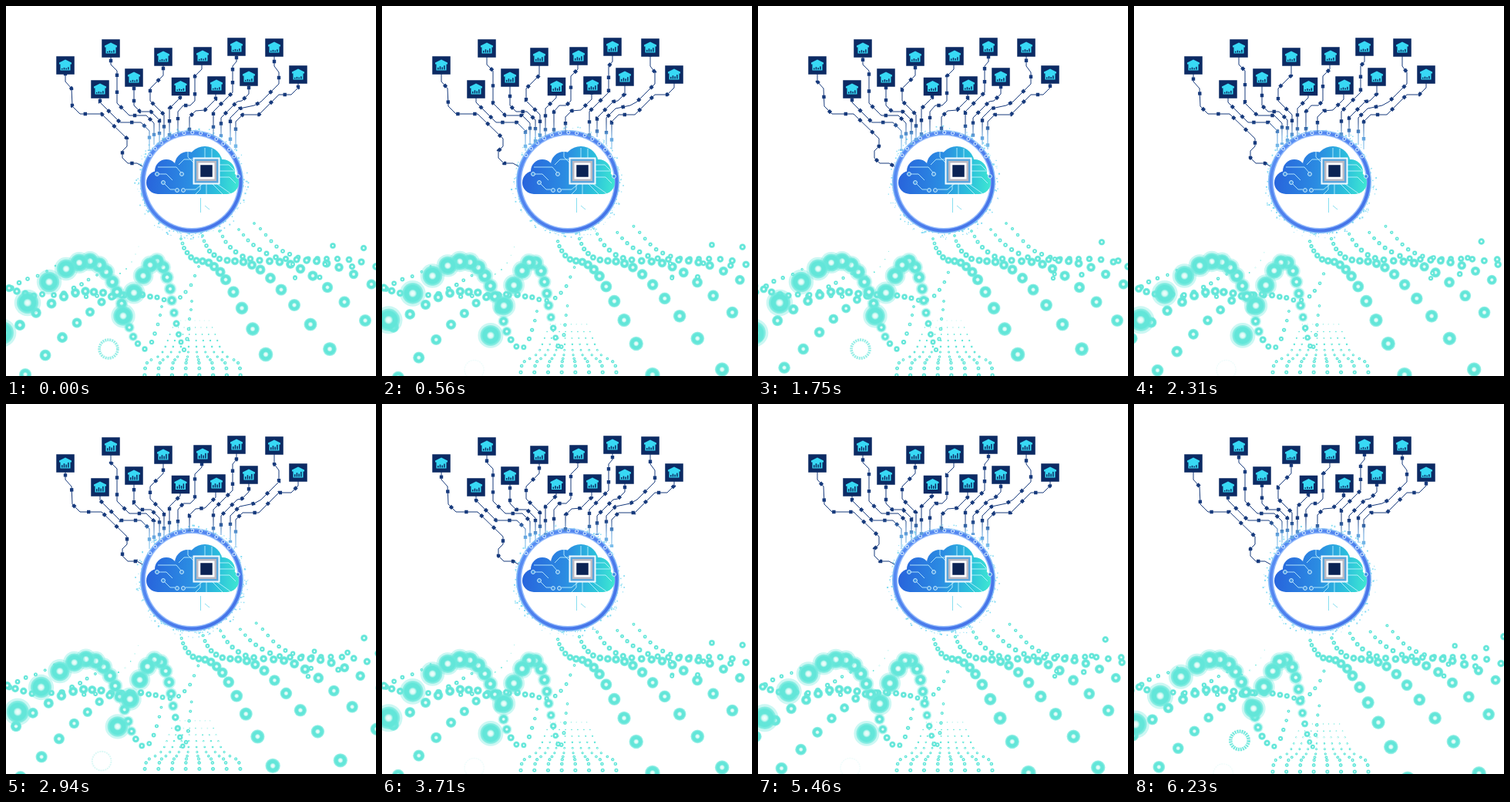
An HTML page with a canvas that plays this animation: 480x480 px, repeating every 6300 ms.

```html
<!DOCTYPE html>
<html lang="en">
<head>
<meta charset="utf-8">
<title>Cloud data streams</title>
<style>
html, body { margin: 0; width: 100%; height: 100%; overflow: hidden; background: #fff; }
canvas { display: block; width: 480px; height: 480px; }
</style>
</head>
<body>
<canvas id="stage" width="480" height="480"></canvas>
<script>
const ctx = document.getElementById('stage').getContext('2d');
const STEP = 70, STEPS = 90, TAU = Math.PI * 2;
const NAVY = '#0c2a63';
let step = 0;

// Position in 0..1 of a motion that repeats `cycles` times per loop
const phase = cycles => (step * cycles / STEPS) % 1;

function seeded(seed) {
  return () => (seed = (seed * 16807) % 2147483647) / 2147483647;
}

function disc(x, y, r, fill) {
  ctx.fillStyle = fill;
  ctx.beginPath();
  ctx.arc(x, y, r, 0, TAU);
  ctx.fill();
}

function box(x, y, size, fill) {
  ctx.fillStyle = fill;
  ctx.fillRect(x - size / 2, y - size / 2, size, size);
}

function line(path, color, width) {
  ctx.strokeStyle = color;
  ctx.lineWidth = width;
  ctx.stroke(new Path2D(path));
}

// ---- particle streams ----

function bead(x, y, r, halo) {
  if (halo) disc(x, y, r * 1.22, 'rgba(110,233,220,.35)');
  const g = ctx.createRadialGradient(x, y, 0, x, y, r);
  const stops = [[0, '#f4fffd'], [.22, '#d8faf5'], [.4, '#64e6d9'], [.75, '#62e6d9'], [1, 'rgba(110,233,220,.6)']];
  for (const [at, color] of stops) g.addColorStop(at, color);
  disc(x, y, r, g);
}

function ghost(x, y, r, alpha) {
  ctx.save();
  ctx.globalAlpha = alpha;
  ctx.setLineDash([2, 1]);
  ctx.strokeStyle = '#62e6d9';
  ctx.lineWidth = 1 + 4 * alpha;
  ctx.beginPath();
  ctx.arc(x, y, r - 2, 0, TAU);
  ctx.stroke();
  ctx.restore();
}

function spline(a, b, c, d, t) {
  return b + t / 2 * (c - a + t * (2 * a - 5 * b + 4 * c - d + t * (3 * (b - c) + d - a)));
}

// Beads travel from each knot to the next one, growing on the way
function stream(cycles, from, to, knots, { power = 1, halo = false, fade = Infinity } = {}) {
  const last = knots.length / 2 - 1, t = phase(cycles);
  const coord = (i, axis) => knots[2 * Math.max(0, Math.min(last, i)) + axis];
  for (let i = 0; i < last; i++) {
    const [x, y] = [0, 1].map(k =>
      spline(coord(i - 1, k), coord(i, k), coord(i + 1, k), coord(i + 2, k), t));
    const u = i + t;
    const r = from + (to - from) * (u / last) ** power;
    if (u > fade) ghost(x, y, r, Math.max(.1, 1 - (u - fade) * 1.1));
    else bead(x, y, r, halo && r > 5);
  }
}

function drawStreams() {
  // right side: five outflows and three rising branches
  stream(18, 2, 5.2, [322,282, 330,289, 337,297, 344,305, 351,312, 359,318, 368,322, 379,326,
    392,328, 404,328, 416,328, 430,328, 445,329, 461,332, 480,338, 500,346]);
  stream(18, 2, 7, [302,290, 308,297, 314,304, 321,310, 329,316, 338,321, 350,326, 363,328,
    377,329, 390,330, 403,331, 416,334, 432,339, 451,348, 474,361, 502,378]);
  stream(18, 2, 8.5, [277,292, 281,299, 285,306, 291,313, 298,319, 307,325, 317,328, 329,330,
    342,331, 355,332, 369,335, 382,341, 398,350, 417,365, 439,384, 466,408, 500,440]);
  stream(18, 2, 9.5, [255,298, 257,305, 260,311, 264,318, 270,323, 277,328, 287,330, 297,331,
    308,332, 319,336, 330,342, 343,353, 357,368, 374,388, 395,413, 420,445, 452,485]);
  stream(18, 2, 10, [227,302, 229,308, 231,314, 235,320, 240,326, 247,330, 255,331, 263,333,
    270,338, 278,345, 285,355, 295,371, 306,392, 320,419, 337,452, 358,492]);
  stream(12, 3, 5, [372,335, 424,311, 485,301]);
  stream(12, 3, 5, [375,352, 414,335, 464,314, 520,295]);
  stream(12, 3, 5, [375,353, 407,352, 449,338, 500,316]);

  // left side: feeders behind the big ribbons
  stream(24, .5, 1.2, [172,312, 168,322, 163,332, 156,341, 148,347, 138,352]);
  stream(24, 1.5, 4.5, [64,337, 53,344, 41,350, 28,354, 17,359, 7,366, -6,373]);
  stream(24, 1.5, 4.5, [128,345, 118,349, 107,355, 98,361, 88,366, 75,373, 62,377]);
  stream(24, 3, 5.5, [118,376, 104,377, 90,375, 76,374, 62,375, 47,374, 36,376, 25,373, 14,370, 4,366, -8,362]);
  stream(24, 2, 7.5, [250,338, 245,350, 240,362, 233,371, 226,378, 215,382, 205,381, 196,378,
    187,377, 177,375, 166,375, 153,375, 139,376, 126,372, 114,371, 103,370, 90,372, 75,377,
    59,386, 39,398, 18,414, -6,434]);
  stream(24, 4, 8.5, [177,374, 163,374, 150,375, 137,377, 124,384, 109,397, 92,411, 73,430, 51,453, 25,478, -5,508]);

  // ribbons
  stream(18, 2, 16, [202,390, 200,401, 197,413, 193,425, 189,436, 180,445, 171,438, 165,429,
    160,417, 156,403, 150,386, 144,371, 138,358, 130,345, 121,336, 109,331, 95,333, 78,341,
    56,358, 28,385, -5,424, -40,470], { power: 1.4, halo: true });
  stream(18, 2, 15, [241,383, 240,394, 238,406, 237,419, 235,432, 231,446, 227,436, 224,426,
    221,412, 218,398, 215,382, 213,367, 209,352, 204,339, 196,331, 187,336, 178,350, 166,372,
    152,402, 133,445, 113,485], { power: 1.7, halo: true, fade: 18.7 });

  // small fan at the bottom
  for (let i = 0; i < 8; i++) {
    const side = (i - 3.5) * 17.4;
    const x = k => 242 + side * k;
    stream(18, .5, 3, [x(.35),408, x(.42),417, x(.48),426, x(.53),434, x(.58),442, x(.64),449,
      x(.74),455, x(.88),459, x(.97),463, x(1.01),470, x(1.02),479, x(1.03),490]);
  }
}

// ---- wires and icons ----

// [path, dot spacing, offset of the first dot, cycles per loop]
const wires = [
  ['M77 88V98L85 107L86 130L96 140H124L157 172V182L151 188V197L158 204H170L177 208', 22, 0, 9],
  ['M136 66V76L144 84V126L160 142H182L192 152V180', 22, 5, 7],
  ['M122 119V125L148 151H175L186 162V188', 18, 4, 7],
  ['M166 104V129L174 137H188L199 148V180', 16, 3, 7],
  ['M204 77V90L187 107V123L205 141V175', 18, 4, 7],
  ['M226 116V119L212 133V170', 18, 3, 7],
  ['M254 76V82L245 91V123L239 129H230L223 137V165', 23, 19, 7],
  ['M272 114V121L258 135L246 136L238 144V165', 20, 6, 7],
  ['M299 64V72L294 78V112L269 137V170', 17, 3, 7],
  ['M315 103V114L306 123L300 124L279 145V170', 16, 3, 7],
  ['M348 65V78L354 86V101L331 124L322 129L303 133L291 145V180', 23, 7, 7],
  ['M379 100V106L370 115H354L328 141H307L298 150V186', 22, 5, 7]
];
const icons = [[77,77], [136,55], [122,108], [166,93], [204,66], [226.5,104.5],
  [255,65], [273,103], [299,53], [315,92], [348,54], [379,89]];

function drawWires() {
  const ink = ctx.createLinearGradient(0, 150, 0, 192);
  ink.addColorStop(0, '#173a7c');
  ink.addColorStop(.45, '#5f9fdb');
  ink.addColorStop(1, '#86cdf3');
  for (const [path, gap, offset, cycles] of wires) {
    const color = path.startsWith('M77') ? '#173a7c' : ink;
    line(path, color, 1);
    ctx.setLineDash([4.4, gap - 4.4]);
    ctx.lineDashOffset = 2.2 - offset - gap * phase(cycles);
    line(path, color, 4.4);
    ctx.setLineDash([]);
  }
}

function drawIcon([x, y]) {
  const grow = .5 - .5 * Math.cos(step / 30 * TAU);
  box(x, y, 23.5, NAVY);
  ctx.save();
  ctx.translate(x, y);
  ctx.fillStyle = '#38d9f5';
  ctx.fill(new Path2D('M0 -7.5L8 -3.5V-1.5H6.5V6.5H-6.5V-1.5H-8V-3.5Z'));
  ctx.fillStyle = NAVY;
  [2.5, 4, 3, 5].forEach((height, i) => {
    const h = height * (.65 + .75 * grow);
    ctx.fillRect(-5 + i * 2.7, 5.5 - h, 1.5, h);
  });
  ctx.restore();
}

// ---- ring, cloud and chip ----

function drawRing() {
  const random = seeded(91 + step % 10 * 577);
  for (let i = 0; i < 190; i++) {
    const angle = random() * TAU, r = 66 + 8 * random() ** 2;
    box(241 + r * Math.cos(angle), 229 + r * Math.sin(angle), .7 + random() * 1.4, '#83dcf3');
  }
  disc(241, 228, 67, '#86bdf8');
  const blue = ctx.createLinearGradient(175, 165, 305, 295);
  blue.addColorStop(0, '#5b91f5');
  blue.addColorStop(1, '#416fe6');
  disc(241, 228, 65.5, blue);
  disc(241, 228, 61.5, '#91b9fb');
  disc(241, 228, 60, '#fff');
  for (let i = 0; i < 13; i++) {
    const angle = Math.PI * (1.18 + i * .054);
    ctx.strokeStyle = '#e3f6ff';
    ctx.lineWidth = 1;
    ctx.beginPath();
    ctx.arc(241 + 64 * Math.cos(angle), 228 + 64 * Math.sin(angle), 2, 0, TAU);
    ctx.stroke();
  }
}

function drawCloud() {
  const fill = ctx.createLinearGradient(184, 225, 302, 235);
  fill.addColorStop(0, '#2865dc');
  fill.addColorStop(.45, '#2b8ce2');
  fill.addColorStop(.75, '#2bbfdc');
  fill.addColorStop(1, '#3fe8d2');
  const lobes = [[197,229,15], [208,214,15], [236,206,17], [258,205,23], [281,215,16], [287,229,15]];
  for (const [x, y, r] of lobes) disc(x, y, r, fill);
  ctx.fillRect(197, 212, 90, 32);

  line('M198 218H208L216 226M197 209H221L227 216M206 231L213 238H219M233 238H246L257 229' +
    'M224 206L231 199H242M236 189V196L243 203M258 184V197M267 185V197M277 206H289L296 213' +
    'M277 214H300M277 222H290L298 230M252 231V238L246 244M260 231V244M268 231L281 244M274 231L291 243',
    'rgba(196,244,255,.85)', 1);
  ctx.lineWidth = 1;
  for (const [x, y] of [[196,218], [228,218], [204,229], [222,239], [230,239], [301,221]]) {
    disc(x, y, 2.4, '#3a8fe2');
    ctx.strokeStyle = '#d5f4ff';
    ctx.stroke();
  }
  line('M252.5 249V268M258 259L264 264', '#87dff0', 1);

  box(260, 214, 35, '#f3fbff');
  box(260, 214, 31, '#58a5dc');
  box(260, 214, 26, '#b9b8c2');
  box(260, 214, 21, '#fff');
  box(260, 214, 15.5, '#0b2354');
}

function draw() {
  ctx.fillStyle = '#fff';
  ctx.fillRect(0, 0, 480, 480);
  drawStreams();
  drawRing();
  drawWires();
  icons.forEach(drawIcon);
  drawCloud();
}

const start = performance.now();
let drawn = -1;
function tick() {
  step = Math.floor((performance.now() - start) / STEP) % STEPS;
  if (step !== drawn) draw();
  drawn = step;
  requestAnimationFrame(tick);
}
tick();
</script>
</body>
</html>
```
